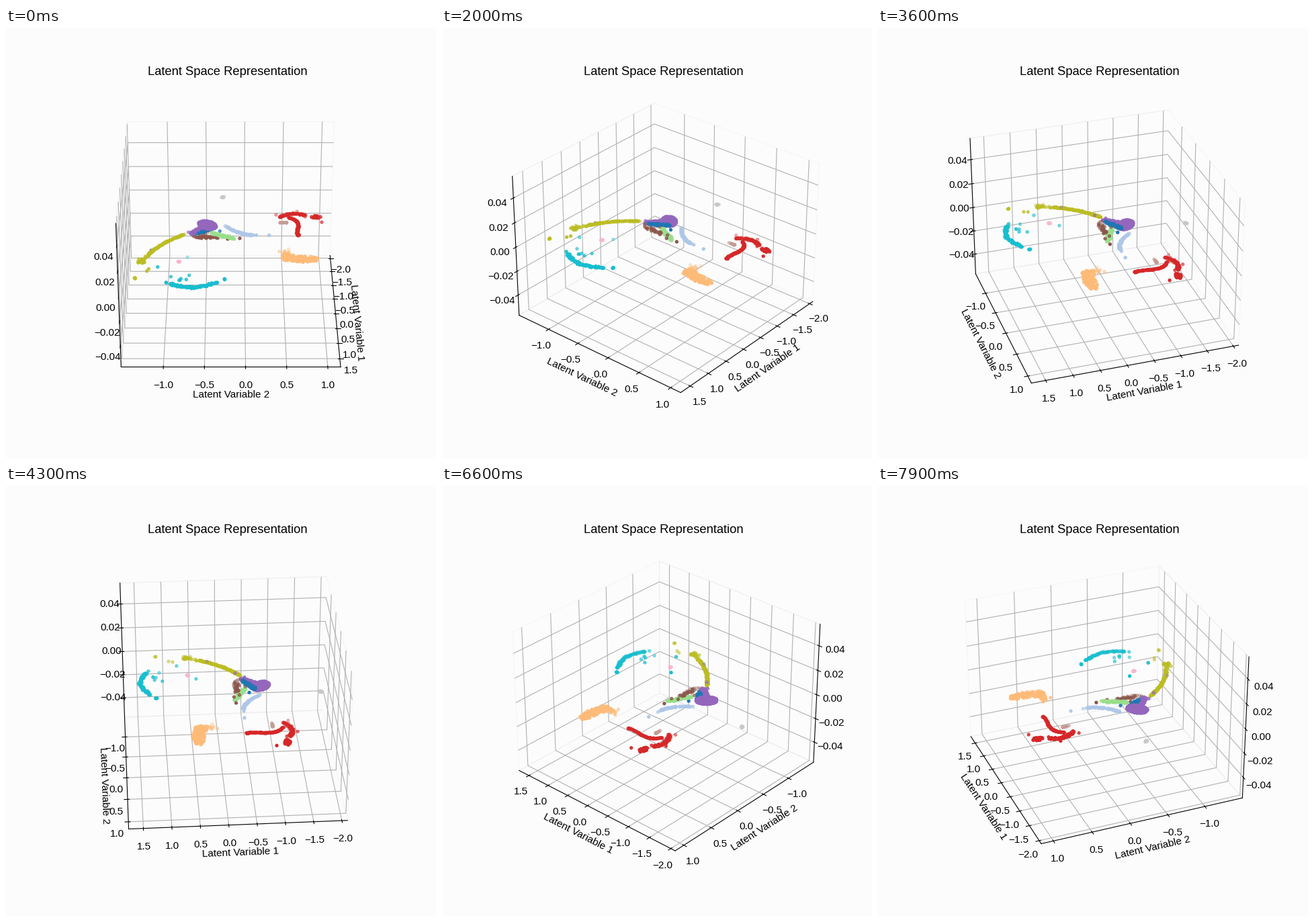
Animation of 640 by 640 pixels, one loop 8 s. Source, as a matplotlib script:

```python
import numpy as np
import matplotlib.pyplot as plt
from matplotlib.animation import FuncAnimation

plt.rcParams.update({
    "font.family": "Liberation Sans",
    "font.size": 11,
    "figure.facecolor": "#fcfcfc",
    "axes.facecolor": "#fcfcfc",
})

FRAMES, INTERVAL, STEP = 80, 100, 2
XLIM, YLIM, ZLIM = (-2.10, 1.758), (-1.514, 1.156), (-0.0573, 0.0573)
BOX = 1190.5  # floor width in cluster units (u, v), centred on zero

rng = np.random.default_rng(4)


def noise(n, sd):
    return np.clip(rng.normal(0, 1, (n, 2)), -2, 2) * sd


def curve(n, sd, *ctrl):
    """Jittered points along a Bezier curve of any degree."""
    t = rng.uniform(0, 1, (n, 1, 1))
    p = np.array(ctrl, float)[None]
    while p.shape[1] > 1:
        p = (1 - t) * p[:, :-1] + t * p[:, 1:]
    return p[:, 0] + noise(n, sd)


def blob(n, sd, centre):
    return noise(n, sd) + centre


def disc(n, radii, centre, slope):
    """Evenly filled, sheared ellipse."""
    a, r = rng.uniform(0, 2 * np.pi, n), np.sqrt(rng.uniform(0, 1, n))
    d = np.c_[r * np.cos(a), r * np.sin(a)] * radii
    d[:, 1] += slope * d[:, 0]
    return d + centre


fig = plt.figure(figsize=(6.4, 6.4), dpi=100)
ax = fig.add_subplot(projection="3d")


def add(color, *parts):
    u, v = np.vstack(parts).T
    x = np.mean(XLIM) + u * np.ptp(XLIM) / BOX
    y = np.mean(YLIM) + v * np.ptp(YLIM) / BOX
    ax.scatter(x, y, np.zeros_like(x), color=color, s=8)


# blue, pale blue
add("#1f77b4", curve(90, 7, (-80, -206), (-140, -102)), [(-108, -62)])
add("#aec7e8", curve(95, 3, (-166, -30), (-68, 42), (-62, 122)),
    [(-62, 143), (-60, 215)])
# orange, pale green
add("#ffbb78", curve(200, (16, 6), (178, 285), (195, 350), (212, 468)),
    blob(8, (20, 20), (135, 305)))
add("#98df8a", curve(80, 6, (-26, 24), (-55, -60), (-90, -110)))
# red: tail, band and end cluster
add("#d62728",
    curve(120, 2.5, (-58, 380), (-120, 355), (-220, 430), (-264, 323)),
    curve(85, 5, (-266, 278), (-340, 360), (-282, 432)),
    blob(34, (8, 13), (-270, 487)),
    [(-296, 259), (-336, 380), (-210, 517)])
# purple, with strays among the olive
add("#9467bd", disc(330, (52, 48), (-178, -133), 0.35),
    curve(55, 8, (-80, -225), (-165, -155)),
    [(108, -441), (-45, -290)])
# browns, pink, grey
add("#8c564b", curve(34, 10, (-50, -205), (-35, -130), (-48, -45)),
    [(-26, 50), (-19, -18), (-90, -130)])
add("#c49c94", curve(11, 3, (-206, 266), (-205, 326)))
add("#f7b6d2", blob(5, 4, (230, -282)))
add("#c7c7c7", blob(8, (4, 7), (-508, -46)))
# olive
add("#bcbd22", curve(190, 3, (-72, -256), (25, -395), (151, -452)),
    curve(8, 4, (151, -452), (205, -480)),
    blob(26, (14, 10), (228, -487)), blob(4, 2, (405, -517)),
    [(330, -456), (307, -447)])
# cyan
add("#17becf", curve(90, 5, (444, -75), (555, -210), (448, -345)),
    blob(4, 2, (415, -36)), blob(2, 4, (288, -399)),
    curve(5, 8, (428, -275), (366, -225)),
    [(389, -324), (182, -239)])

ax.set_title("Latent Space Representation", x=0.504, pad=5)
ax.set_xlabel("Latent Variable 1", labelpad=-1)
ax.set_ylabel("Latent Variable 2", labelpad=-1)
ax.set(xlim=XLIM, ylim=YLIM, zlim=ZLIM)
ax.set_xticks(np.arange(-2, 1.6, 0.5))
ax.set_yticks(np.arange(-1, 1.1, 0.5))
ax.set_zticks(np.arange(-2, 3) * 0.02)
ax.tick_params(pad=1.8)
for axis in (ax.xaxis, ax.yaxis, ax.zaxis):
    axis.pane.fill = False


def update(i):
    ax.view_init(elev=30, azim=STEP * i)
    return ()


anim = FuncAnimation(fig, update, frames=FRAMES, interval=INTERVAL, repeat=True,
                     init_func=lambda: update(0))
plt.show()
```
